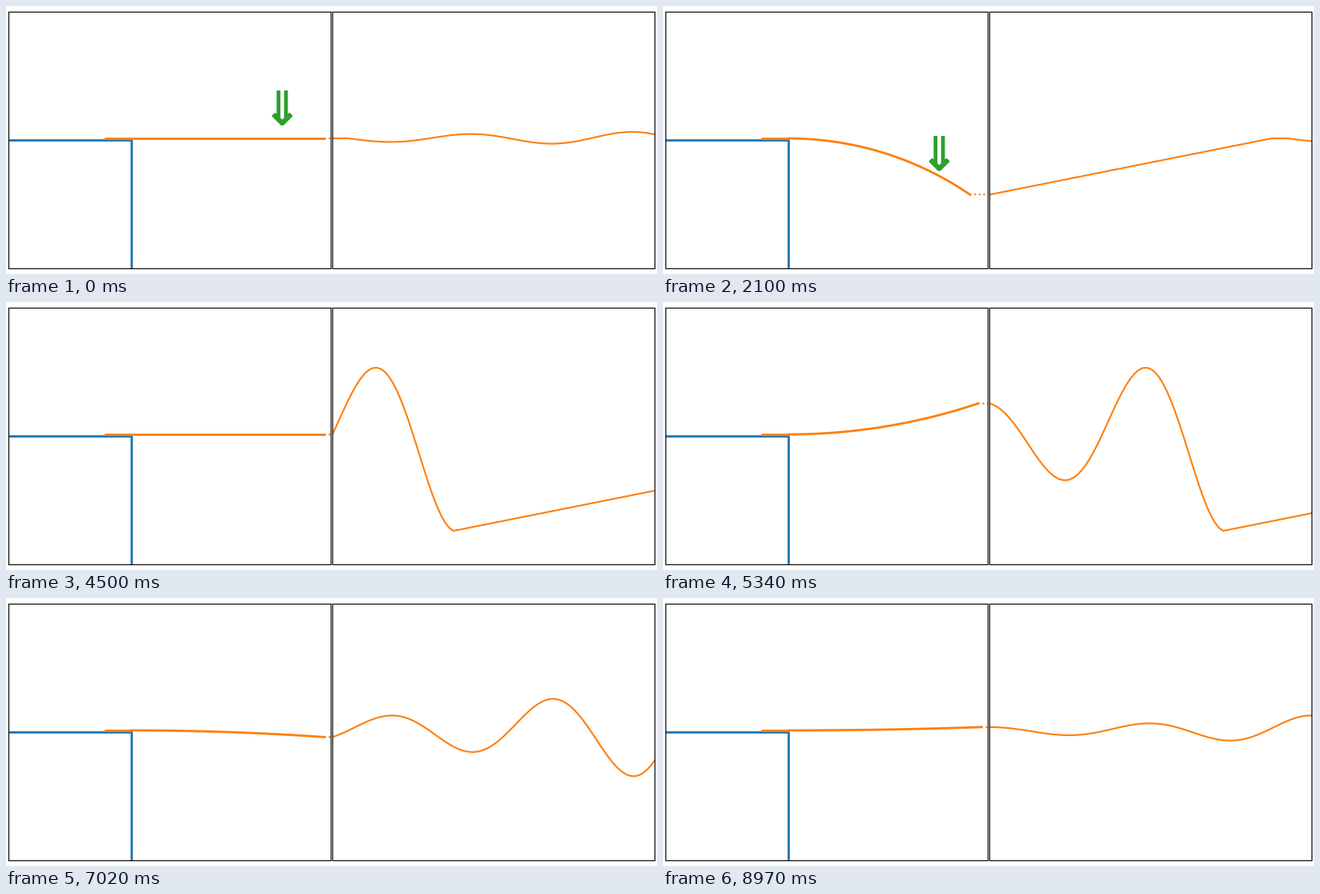
Recreate the animation shown at these times as a matplotlib script. Size 800x330 px, loop 9 s.

```python
import numpy as np
import matplotlib.pyplot as plt
from matplotlib.animation import FuncAnimation

W, H, DPI = 800, 330, 100
UNIT = 99            # pixels per data unit
FRAMES, INTERVAL = 300, 30
STEP = 0.05          # paper feed per frame

LENGTH = 2.4         # free part of the ruler
HELD = 0.32          # part lying on the table
REST = 0.02          # ruler height above the table top
RELEASE = 120        # frame at which the ruler is let go
EDGE = 151 / UNIT    # table edge, from the left border
PANEL_W, PANEL_H = 396, 316
MARGIN = 2.8
BOTTOM = (H - PANEL_H) / 2


def deflection(n):
    """Height of the tip relative to rest at (an array of) frames."""
    n = np.asarray(n, dtype=float)
    before = np.clip(-4 - n, 0, None)
    after = np.clip(n - RELEASE, 0, None)
    residual = -0.04 * np.exp(0.01 * before) * np.sin(np.pi * before / 20)
    swing = -1.2 * np.exp(-0.01875 * after) * np.cos(np.pi * after / 20)
    return np.where(n < 0, residual, np.where(n < RELEASE, -0.01 * n, swing))


def rise(angle):
    """(1 - cos a) / a, safe at zero."""
    return np.sin(angle / 2) * np.sinc(angle / (2 * np.pi))


ANGLES = np.linspace(-1.3, 1.3, 2601)
RISES = rise(ANGLES)
ARC = np.linspace(0, 1, 60)


def bent_ruler(height):
    """Circular arc of constant length whose tip is at the given height."""
    angle = np.interp(height / LENGTH, RISES, ANGLES)
    phi = angle * ARC
    s = LENGTH * ARC
    return s * np.sinc(phi / np.pi), REST + s * rise(phi)


def panel(fig, left, x0):
    ax = fig.add_axes([left / W, BOTTOM / H, PANEL_W / W, PANEL_H / H])
    half = PANEL_H / UNIT / 2
    ax.set(xlim=(x0, x0 + PANEL_W / UNIT), ylim=(-half, half),
           xticks=[], yticks=[])
    return ax


fig = plt.figure(figsize=(W / DPI, H / DPI), dpi=DPI, facecolor="white")
scene = panel(fig, MARGIN, -EDGE)
paper = panel(fig, W - MARGIN - PANEL_W, 0)
right = scene.get_xlim()[1]

scene.plot([-2, 0, 0], [0, 0, -2], "C0", lw=2)
scene.plot([-HELD, 0], [REST, REST], "C1", lw=2)
ruler, = scene.plot([], [], "C1", lw=2)
link, = scene.plot([], [], "C1:", lw=1.5)
arrow, = scene.plot([], [], color="C2", ls="none",
                    marker=r"$\Downarrow$", ms=30)
trace, = paper.plot([], [], "C1", lw=1.5)

AGES = np.arange(83)


def update(n):
    x, y = bent_ruler(float(deflection(n)))
    ruler.set_data(x, y)
    link.set_data([x[-1], right], [y[-1], y[-1]])
    trace.set_data(STEP * AGES, REST + deflection(n - AGES))
    arrow.set_data([1.87], [0.4 - 0.008 * n])
    arrow.set_visible(n < RELEASE)
    return ruler, link, arrow, trace


anim = FuncAnimation(fig, update, frames=FRAMES, interval=INTERVAL,
                     init_func=lambda: update(0), repeat=True)
plt.show()
```
